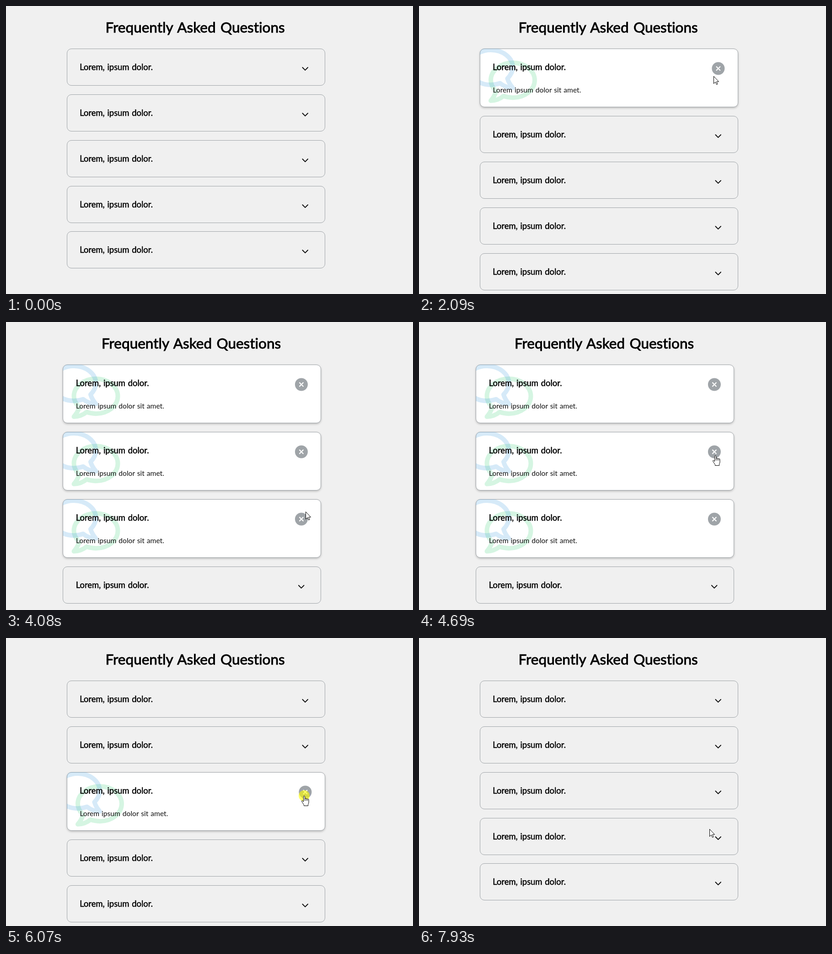
Recreate the animation shown at these times as an HTML page. Size 890x629 px, loop 8 s.

```html
<!DOCTYPE html>
<html lang="en">
<head>
<meta charset="utf-8">
<title>FAQ accordion</title>
<style>
  html, body { margin: 0; width: 100%; height: 100%; overflow: hidden; background: #f0f0f0; }
  svg { display: block; font-family: Lato, "Open Sans", sans-serif; font-variant-ligatures: none; }
  text { fill: #000; }
  .title { font-size: 31.5px; word-spacing: 2.3px; stroke: #000; stroke-width: .9px; }
  .question { font-size: 18.4px; word-spacing: 1px; stroke: #000; stroke-width: .5px; }
  .answer { font-size: 15.6px; word-spacing: 1px; fill: #111; }
  .box { stroke: #9fa4a8; }
  .open .box { filter: drop-shadow(0 2px 2px rgba(0, 0, 0, .22)); }
  .when-open, .open .when-closed { display: none; }
  .open .when-open { display: inline; }
  .chevron { fill: none; stroke: #111; stroke-width: 2; stroke-linecap: round; stroke-linejoin: round; }
  .bubble { fill: none; stroke-width: 48; stroke-linejoin: round; opacity: .2; }
  .cursor { fill: #fff; stroke: #000; }
</style>
</head>
<body>
<svg width="890" height="629" viewBox="0 0 890 629">
  <defs>
    <clipPath id="card"><rect x="133" y="0" width="565" height="128" rx="10"/></clipPath>
    <path id="bubble" d="M24 456C85 456 130 430 159 407Q205 424 256 424C384 424 488 342 488 240S384 56 256 56 24 138 24 240C24 290 48 325 80 358Q64 410 24 456Z"/>
  </defs>
  <text id="title" class="title" x="217.6" y="58">Frequently Asked Questions</text>
  <g id="list"></g>
  <g id="pointer">
    <circle id="flash" r="12" cy="-.5" fill="#ff0" opacity=".6"/>
    <path id="arrow" class="cursor" d="M.5 .5V16.5L4.2 13 6.6 18.5 9 17.5 6.7 12.2H11.5Z"/>
    <path id="hand" class="cursor" d="M-1.5 12.5V1.5a1.5 1.5 0 0 1 3 0V6.5q0-1.3 1.6-1.2 1.4.1 1.4 1.5 0-1.2 1.6-1 1.4.2 1.4 1.6 0-1 1.2-.8 1.3.2 1.3 1.6V14q0 2-1.5 4.5V21.5H-.5V19.5L-5 12.5q-1-1.8.3-2.3 1.2-.3 3.2 2.3zM1.5 6.5V10.5M4.5 6.8V10.5M7.5 7.4V10.5"/>
  </g>
</svg>
<script>
const LOOP = 8000, COUNT = 5;
const FIRST_TOP = 93.4, CLOSED_STEP = 99.75, OPEN_STEP = 146.95;
const SCROLLBAR_SHIFT = -8.5;
const BUTTON = { x: 654.4, y: 43.5, r: 14 };
const TOGGLE_DELAY = 110, PRESS_LENGTH = 220;
const LEAD = 180, TRAVEL = 560;

// dx, dy: where on the button the pointer lands
const presses = [
  { at: 1560, item: 0, dx: -12, dy: -2 },
  { at: 2710, item: 1, dx: -1, dy: 8 },
  { at: 3530, item: 2, dx: 1, dy: 0 },
  { at: 4700, item: 1, dx: 2, dy: 8 },
  { at: 5500, item: 0, dx: 3, dy: 10 },
  { at: 6010, item: 2, dx: -2, dy: 8 }
];

const $ = id => document.getElementById(id);
const show = (el, on) => el.setAttribute('display', on ? 'inline' : 'none');
const move = (el, x, y) => el.setAttribute('transform', `translate(${x} ${y})`);
const mix = (a, b, k) => a + (b - a) * k;
const smooth = k => k * k * (3 - 2 * k);

function layout(t) {
  const open = Array(COUNT).fill(false);
  for (const p of presses) if (t >= p.at + TOGGLE_DELAY) open[p.item] = !open[p.item];
  let next = FIRST_TOP;
  const tops = open.map(isOpen => {
    const top = Math.round(next);
    next += isOpen ? OPEN_STEP : CLOSED_STEP;
    return top;
  });
  const dx = open.filter(Boolean).length > 2 ? SCROLLBAR_SHIFT : 0;
  return { open, tops, dx };
}

// Each stop is reached at "from" and left no earlier than "to".
const pause = (from, to, x, y) => ({ from, to, x, y });
const stops = [
  pause(70, 70, 767, 549),
  pause(270, 430, 658, 471),
  pause(860, 860, 330, 200),
  ...presses.map(p => {
    const { tops, dx } = layout(p.at);
    return pause(p.at - LEAD, p.at + PRESS_LENGTH, BUTTON.x + dx + p.dx, tops[p.item] + BUTTON.y + p.dy);
  }),
  pause(7150, 7150, 144, 354),
  pause(7530, 7640, 171, 322),
  pause(7930, LOOP, 635, 417)
];

function pointerAt(t) {
  const i = stops.findIndex(s => s.from > t);
  if (i === 0) return [stops[0].x, stops[0].y];
  const a = stops.at(i < 0 ? -1 : i - 1), b = stops.at(i);
  const start = Math.max(a.to, b.from - TRAVEL);
  const k = smooth(Math.min(1, Math.max(0, (t - start) / (b.from - start))));
  return [Math.round(mix(a.x, b.x, k)), Math.round(mix(a.y, b.y, k))];
}

const card = `
  <rect class="box" x="133.5" y=".5" width="564" rx="9.5"/>
  <g class="when-open" clip-path="url(#card)">
    <use href="#bubble" class="bubble" stroke="#2ecc71" transform="translate(152 19.4) scale(.207)"/>
    <use href="#bubble" class="bubble" stroke="#3498db" transform="translate(210 -8.6) scale(-.207 .207)"/>
  </g>
  <text class="question" x="161.2" y="47">Lorem, ipsum dolor.</text>
  <path class="when-closed chevron" d="M648.4 41.3l5.8 5.8l5.8-5.8"/>
  <g class="when-open">
    <text class="answer" x="161.4" y="95.5">Lorem ipsum dolor sit amet.</text>
    <circle cx="${BUTTON.x}" cy="${BUTTON.y}" r="${BUTTON.r}" fill="#9fa4a8"/>
    <path d="M649.9 39l9 9m0-9l-9 9" stroke="#fff" stroke-width="2.2"/>
  </g>`;

const items = Array.from({ length: COUNT }, () => {
  const g = document.createElementNS('http://www.w3.org/2000/svg', 'g');
  g.innerHTML = card;
  $('list').append(g);
  return g;
});

function draw(t) {
  const { open, tops, dx } = layout(t);
  const [px, py] = pointerAt(t);

  move($('title'), dx, 0);
  items.forEach((g, i) => {
    const box = g.firstElementChild;
    move(g, dx, tops[i]);
    g.setAttribute('class', open[i] ? 'open' : '');
    box.setAttribute('x', 133.5 + Math.floor(dx) - dx);
    box.setAttribute('height', open[i] ? 127 : 80);
    box.setAttribute('fill', open[i] ? '#fff' : '#f0f0f0');
  });

  const hover = tops.some(y => Math.hypot(px - BUTTON.x - dx, py - BUTTON.y - y) < BUTTON.r);
  move($('pointer'), px, py);
  show($('pointer'), t >= stops[0].from);
  show($('hand'), hover);
  show($('arrow'), !hover);
  show($('flash'), presses.some(p => t >= p.at && t < p.at + PRESS_LENGTH));
}

let start;
function tick(now) {
  start ??= now;
  draw((now - start) % LOOP);
  requestAnimationFrame(tick);
}
draw(0);
requestAnimationFrame(tick);
</script>
</body>
</html>
```
